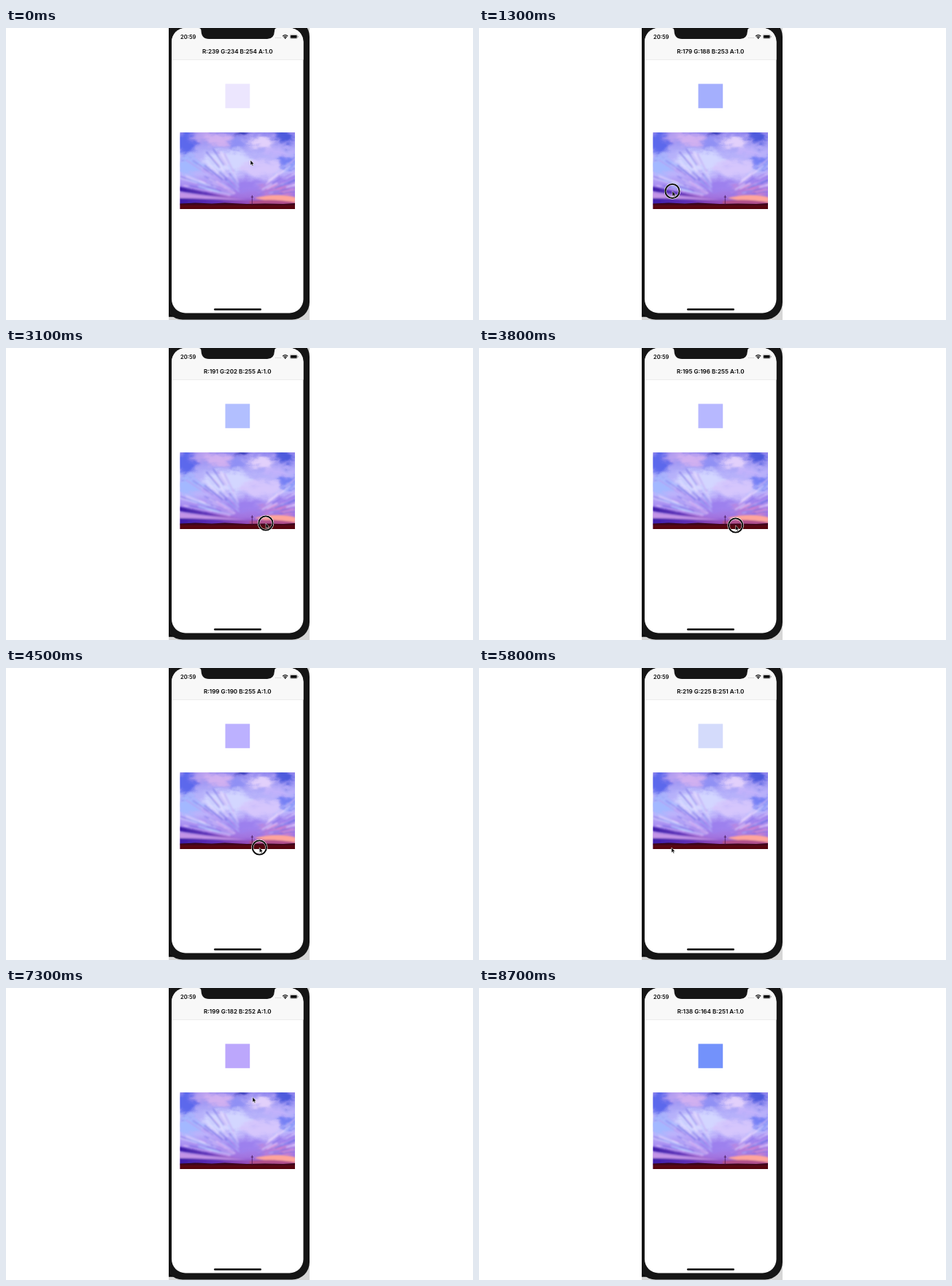
Recreate the animation shown at these times as an HTML page. Size 640 px wide and 400 px high, loop 9000 ms.

```html
<!DOCTYPE html>
<html lang="en">
<head>
<meta charset="utf-8">
<title>Colour picker</title>
<style>
html, body { margin: 0; width: 100%; height: 100%; overflow: hidden; background: #fff; }
svg { display: block; width: 640px; height: 400px; }
text { font-family: Inter, "Liberation Sans", sans-serif; font-weight: 600; fill: #050505; }
</style>
</head>
<body>
<svg viewBox="0 0 640 400">
  <defs>
    <clipPath id="crop"><rect x="223" width="193" height="400"/></clipPath>
    <clipPath id="screen"><rect x="227" width="180.5" height="390.500" rx="19"/></clipPath>
    <clipPath id="frame"><rect x="238.5" y="143" width="157.5" height="105"/></clipPath>
    <linearGradient id="sky" x2="0" y2="1">
      <stop offset="0" stop-color="#8f84ee"/>
      <stop offset=".28" stop-color="#b5b0fa"/>
      <stop offset=".55" stop-color="#bcb2fb"/>
      <stop offset=".72" stop-color="#a284ee"/>
      <stop offset=".84" stop-color="#a274e0"/>
      <stop offset=".93" stop-color="#8a4cc4"/>
    </linearGradient>
    <linearGradient id="dusk">
      <stop offset="0" stop-color="#3a1ca8"/>
      <stop offset=".5" stop-color="#5a2bb4" stop-opacity=".85"/>
      <stop offset="1" stop-color="#b04a9c" stop-opacity=".2"/>
    </linearGradient>
    <linearGradient id="ground" x2="0" y2="1">
      <stop offset="0" stop-color="#2c0420"/>
      <stop offset=".5" stop-color="#5c0712"/>
      <stop offset="1" stop-color="#4a0208"/>
    </linearGradient>
    <filter id="cloud" x="-20%" y="-20%" width="140%" height="140%">
      <feGaussianBlur stdDeviation="3.2" result="soft"/>
      <feTurbulence type="fractalNoise" baseFrequency=".045 .08" numOctaves="3" seed="5"/>
      <feDisplacementMap in="soft" scale="22" xChannelSelector="R" yChannelSelector="G"/>
    </filter>
    <filter id="fine" x="-20%" y="-20%" width="140%" height="140%"><feGaussianBlur stdDeviation=".8"/></filter>
  </defs>

  <g clip-path="url(#crop)">
    <rect x="223" width="193" height="400" fill="#d6d6d6"/>
    <rect x="223" y="380" width="9" height="15.700" fill="#050505"/>
    <rect x="218" y="-12" width="198" height="411.500" rx="24" fill="#151515"/>
    <g clip-path="url(#screen)">
      <rect x="227" width="181" height="392" fill="#fff"/>
      <rect x="227" width="181" height="43" fill="#f8f8f8"/>
      <rect x="227" y="43" width="181" height=".6" fill="#e0e0e0"/>
    </g>
    <path d="M264 0Q267.500 0 267.500 4Q268 15 278 15H358Q367.500 15 368 4Q368 0 371.500 0Z" fill="#151515"/>
  </g>

  <text x="239" y="14.500" font-size="7.5">20:59</text>
  <g fill="#b5b5b5">
    <circle cx="369.700" cy="13.500" r=".6"/><circle cx="371.900" cy="13.500" r=".6"/>
    <circle cx="374.100" cy="13.500" r=".6"/><circle cx="376.300" cy="13.500" r=".6"/>
  </g>
  <g fill="none" stroke="#080808" stroke-width="1.3">
    <path d="M379.200 11.200Q382.700 8 386.200 11.200M380.600 12.700Q382.700 10.900 384.800 12.700"/>
    <circle cx="382.700" cy="14" r=".4"/>
  </g>
  <rect x="389.300" y="9.200" width="10" height="5.300" rx="1.500" fill="none" stroke="#888" stroke-width=".6"/>
  <rect x="390" y="9.900" width="8.600" height="3.900" rx=".8" fill="#080808"/>
  <rect x="399.900" y="11" width=".7" height="1.700" fill="#888"/>
  <rect x="285" y="384.200" width="65" height="2.600" rx="1.300" fill="#050505"/>

  <text id="label" x="317.300" y="35.300" font-size="8.1" text-anchor="middle"></text>
  <rect id="swatch" x="300.500" y="76.500" width="33.700" height="33.300"/>

  <g clip-path="url(#frame)">
    <rect x="238" y="143" width="158" height="105" fill="url(#sky)"/>
    <g filter="url(#cloud)">
      <ellipse cx="246" cy="158" rx="15" ry="15" fill="#5c68ec"/>
      <ellipse cx="266" cy="150" rx="12" ry="8" fill="#b8a0f0"/>
      <ellipse cx="292" cy="152" rx="20" ry="9" fill="#d2b0f0"/>
      <ellipse cx="322" cy="144" rx="8" ry="4" fill="#2c30b0"/>
      <ellipse cx="318" cy="160" rx="15" ry="7" fill="#8f90f4"/>
      <ellipse cx="350" cy="157" rx="19" ry="9" fill="#e2d0fb"/>
      <ellipse cx="384" cy="149" rx="13" ry="8" fill="#4c58dc"/>
      <ellipse cx="372" cy="170" rx="18" ry="6" fill="#c3b2fb"/>
      <ellipse cx="387" cy="183" rx="14" ry="9" fill="#7680f4"/>
      <ellipse cx="250" cy="188" rx="18" ry="13" fill="#a3b8ff"/>
      <ellipse cx="302" cy="183" rx="32" ry="15" fill="#d3d6ff"/>
      <ellipse cx="350" cy="192" rx="26" ry="10" fill="#d6c6fc"/>
      <ellipse cx="384" cy="208" rx="18" ry="5" fill="#9a7cec"/>
      <ellipse cx="325" cy="214" rx="22" ry="7" fill="#9c80ee"/>
      <ellipse cx="374" cy="222" rx="26" ry="6" fill="#cb7fd0"/>
    </g>
    <g id="streaks" filter="url(#fine)" fill="none" stroke-linecap="round"></g>
    <g filter="url(#fine)">
      <path d="M236 217Q274 225 322 234Q276 231 236 223Z" fill="url(#dusk)"/>
      <path d="M236 225Q275 231 330 235H236Z" fill="#c394e6"/>
      <path d="M236 233Q290 234 345 237V242H236Z" fill="url(#dusk)"/>
      <path d="M340 233Q372 225 397 232V239Q372 240 340 233Z" fill="#ffa59c"/>
      <path d="M334 237Q366 233 397 239V242H334Z" fill="#b0508c"/>
    </g>
    <path d="M238 240.500L260 239.500L282 240.500L300 239.500L330 241L355 240.500L380 241L397 240V249H238Z" fill="url(#ground)"/>
    <path d="M337.300 229V242M335.700 231.500H339" stroke="#40104e" stroke-width=".7"/>
  </g>

  <g id="pointer">
    <g id="ring" fill="none">
      <circle r="9.600" stroke="#fff" stroke-width="3"/>
      <circle r="9.600" stroke="#050505" stroke-width="1.900"/>
    </g>
    <path d="M0 0V7L1.600 5.600L2.700 8.100L3.900 7.600L2.800 5.200H4.900Z" fill="#050505" stroke="#fff" stroke-width=".5"/>
  </g>
</svg>
<script>
const LOOP = 9000, STEP = 100;
const $ = id => document.getElementById(id);

// time, pointer x, y, then red, green, blue
const keys = [
  [0, 335, 181, 239, 234, 254],
  [1300, 265, 223.5, 179, 188, 253],
  [3100, 356, 240, 191, 202, 255],
  [4500, 347.3, 246, 199, 190, 255],
  [5800, 263.8, 246, 219, 225, 251],
  [7300, 338, 149.5, 199, 182, 252],
  [8700, 300, 205, 138, 164, 251]
];

// wisps of cloud fanning out from a point on the horizon
function drawStreaks() {
  const tones = ["#ece4ff", "#6a62e0", "#c093ee", "#b4c4ff", "#f0d4fa", "#8578ea"];
  let seed = 17, out = "";
  const rand = () => (seed = seed * 16807 % 2147483647) / 2147483647;
  for (let i = 0; i < 130; i++) {
    const left = rand() < 0.65;
    const angle = Math.PI * (left ? 1.06 + rand() * 0.34 : 1.7 + rand() * 0.24);
    const near = 12 + rand() * 46, far = near + 10 + rand() * 16;
    const at = r => `${(330 + Math.cos(angle) * r * 1.5).toFixed(1)} ${(234 + Math.sin(angle) * r).toFixed(1)}`;
    const tone = tones[Math.floor(rand() * tones.length)];
    out += `<path d="M${at(near)}L${at(far)}" stroke="${tone}" stroke-width="${(0.6 + rand() * 1.8).toFixed(1)}" opacity=".55"/>`;
  }
  $("streaks").innerHTML = out;
}

function sample(t) {
  const i = keys.findIndex(k => k[0] > t);
  if (i < 0) return keys[keys.length - 1];
  const a = keys[i - 1], b = keys[i];
  const p = (t - a[0]) / (b[0] - a[0]), e = p * p * (3 - 2 * p);
  return a.map((v, n) => v + (b[n] - v) * e);
}

function render(t) {
  const [, x, y, ...rgb] = sample(t);
  const [r, g, b] = rgb.map(Math.round);
  $("label").textContent = `R:${r} G:${g} B:${b} A:1.0`;
  // the display shows the colour a little more saturated than its values
  const shown = [r, g].map(v => Math.round(255 - (255 - v) * 1.2));
  $("swatch").setAttribute("fill", `rgb(${shown},${b})`);
  $("pointer").setAttribute("transform", `translate(${x.toFixed(2)} ${y.toFixed(2)})`);
  $("pointer").style.display = t < 8400 ? "" : "none";
  $("ring").style.display = t >= 500 && t < 5500 ? "" : "none";
}

function tick() {
  const t = performance.now() % LOOP;
  render(Math.min(8700, Math.floor(t / STEP) * STEP));
  requestAnimationFrame(tick);
}

drawStreaks();
tick();
</script>
</body>
</html>
```
